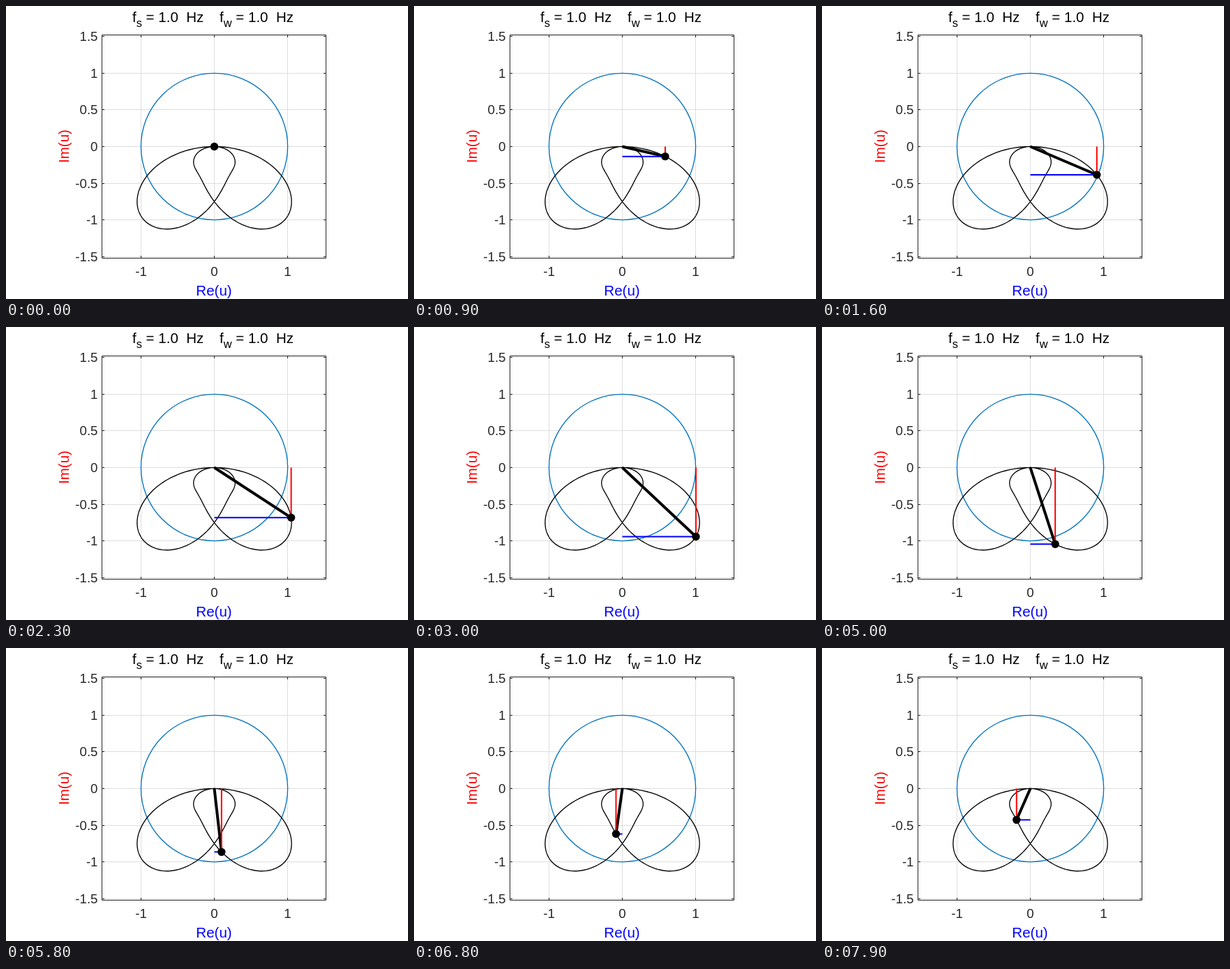
These frames come from a looping animation (576x420 px, 8000 ms). An HTML page:

```html
<!DOCTYPE html>
<html lang="en">
<head>
<meta charset="utf-8">
<title>Winding phasor</title>
<style>
html, body { margin: 0; width: 100%; height: 100%; overflow: hidden; background: #fff; }
svg { display: block; width: 576px; height: 420px; }
text { font-family: "Liberation Sans", Arial, sans-serif; font-size: 18.67px; fill: #262626; white-space: pre; }
.label { font-size: 20.53px; }
.sub { font-size: 16.4px; }
.mid { text-anchor: middle; }
.end { text-anchor: end; }
</style>
</head>
<body>
<svg id="plot" viewBox="0 0 576 420"></svg>
<script>
const plot = document.getElementById('plot');
const OX = 298.5, OY = 201.5, UNIT = 105.1;
const BOX = { left: 137.5, right: 458.5, top: 41.5, bottom: 361.5 };
const STEP_MS = 100, LOOP_MS = 8000, STEPS_PER_TURN = 250;

function add(tag, attrs, content) {
  const el = document.createElementNS('http://www.w3.org/2000/svg', tag);
  for (const key in attrs) el.setAttribute(key, attrs[key]);
  if (content !== undefined) el.textContent = content;
  plot.appendChild(el);
  return el;
}

const path = (d, stroke, width) =>
  add('path', { d, stroke, 'stroke-width': width, fill: 'none' });
const px = re => OX + re * UNIT;
const py = im => OY - im * UNIT;
const crisp = v => Math.floor(v) + 0.5;

// Signal with three harmonics, wound clockwise around the origin.
function wound(step) {
  const a = step / STEPS_PER_TURN * 2 * Math.PI;
  const r = Math.sin(a) + Math.sin(2 * a) / 2 + Math.sin(3 * a) / 4;
  return [px(r * Math.cos(a)), py(-r * Math.sin(a))];
}

function drawAxes() {
  const { left, right, top, bottom } = BOX;
  const xs = [-1, 0, 1], ys = [-1.5, -1, -0.5, 0, 0.5, 1, 1.5];
  let grid = '', ticks = '';
  for (const v of xs) {
    const x = crisp(px(v));
    grid += `M${x} ${top}V${bottom}`;
    ticks += `M${x} ${top}v3.5M${x} ${bottom}v-3.5`;
    add('text', { x, y: 387, class: 'mid' }, v);
  }
  for (const v of ys) {
    const y = crisp(py(v));
    grid += `M${left} ${y}H${right}`;
    ticks += `M${left} ${y}h3.5M${right} ${y}h-3.5`;
    add('text', { x: 131.5, y: y + 6.5, class: 'end' }, v);
  }
  path(grid, '#dedede', 1);
  path(`M${left} ${top}H${right}V${bottom}H${left}Z` + ticks, '#262626', 1);
}

function drawLabels() {
  add('text', { x: 298, y: 415, class: 'label mid', style: 'fill:#00f' }, 'Re(u)');
  add('text', { transform: 'translate(89.5 201) rotate(-90)', class: 'label mid', style: 'fill:#f00' }, 'Im(u)');
  const title = add('text', { x: 181, y: 23, class: 'label', style: 'fill:#000' });
  const parts = [['f', 0], ['s', 7], [' = 1.0  Hz    f', -7], ['w', 7], [' = 1.0  Hz', -7]];
  for (const [str, dy] of parts) {
    const span = add('tspan', { dy, class: dy > 0 ? 'sub' : 'label' }, str);
    title.appendChild(span);
  }
}

function drawCurves() {
  add('circle', { cx: OX, cy: OY, r: UNIT, fill: 'none', stroke: '#0072bd', 'stroke-width': 1.33 });
  const points = Array.from({ length: STEPS_PER_TURN + 1 }, (_, i) => wound(i).map(v => v.toFixed(2)));
  path('M' + points.join('L'), '#000', 1.33);
}

drawAxes();
drawLabels();
drawCurves();
const arm = path('', '#000', 4);
const rePart = path('', '#00f', 2);
const imPart = path('', '#f00', 2);
const dot = add('circle', { r: 5.7 });

function render(ms) {
  const [x, y] = wound(Math.floor(ms % LOOP_MS / STEP_MS));
  arm.setAttribute('d', `M${OX} ${OY}L${x} ${y}`);
  rePart.setAttribute('d', `M${OX} ${y}H${x}`);
  imPart.setAttribute('d', `M${x} ${OY}V${y}`);
  dot.setAttribute('cx', x);
  dot.setAttribute('cy', y);
}

const start = performance.now();
function tick() {
  render(performance.now() - start);
  requestAnimationFrame(tick);
}
tick();
</script>
</body>
</html>
```
